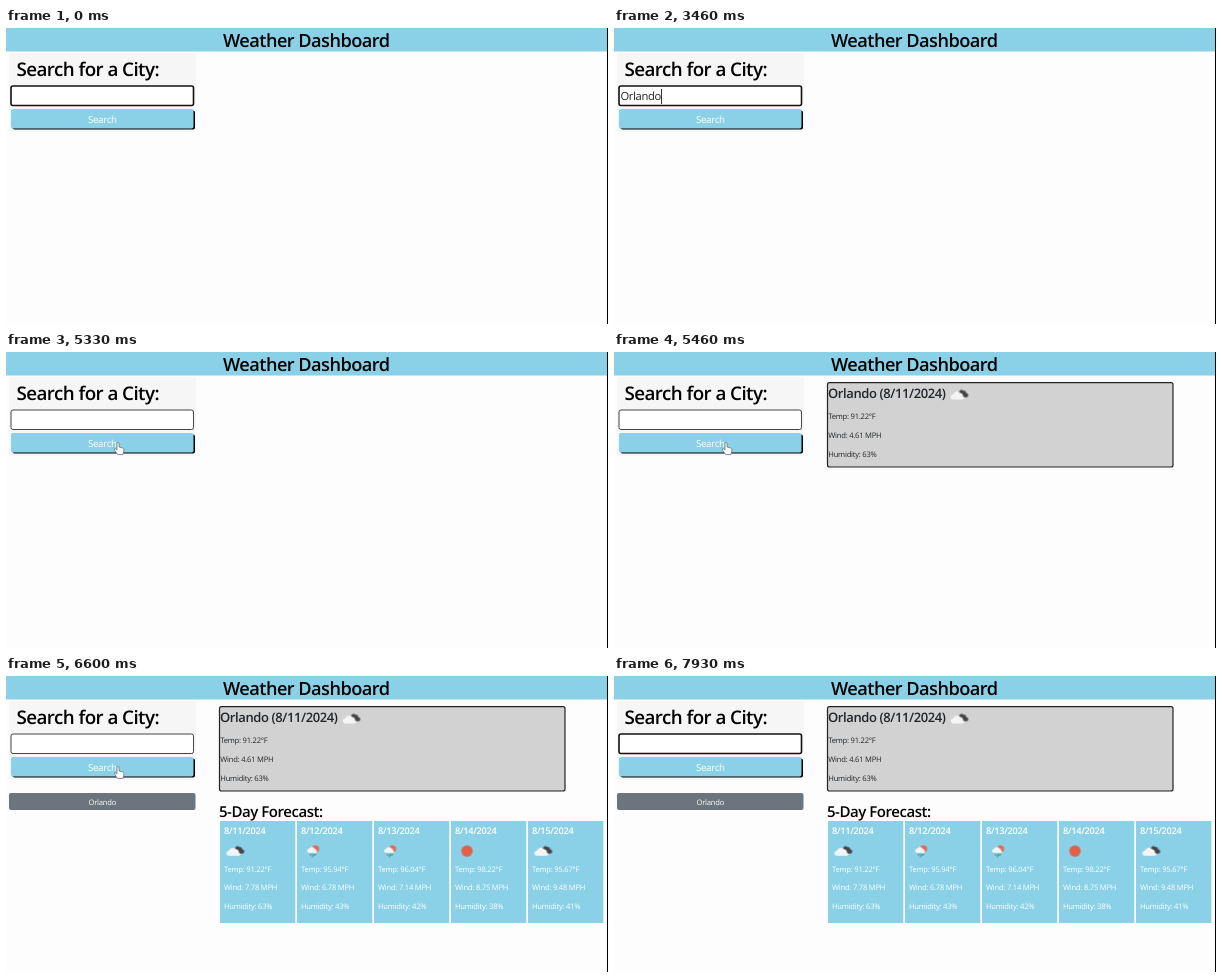
An HTML page for the animation above (8 s loop, 602x296 px).

```html
<!DOCTYPE html>
<html lang="en">
<head>
<meta charset="utf-8">
<title>Weather Dashboard</title>
<style>
  html, body { margin: 0; width: 100%; height: 100%; overflow: hidden; background: #fdfdfd; }
  svg { position: absolute; left: 0; top: 0; }
  text, .typed {
    font-family: "Open Sans", "Noto Sans", sans-serif;
    letter-spacing: -.03em;
    text-rendering: geometricPrecision;
    white-space: pre;
  }
  .h { font-weight: 600; }
  .mid { text-anchor: middle; }
  .small { font-size: 7.6px; }
  .white { fill: #fff; }

  .card, .card-icon, .days, .days-icon, .cursor, .typed, .ring {
    animation: 8s step-end infinite;
  }
  .card { animation-name: card; }
  .card-icon { animation-name: card-icon; }
  .days { animation-name: days; }
  .days-icon { animation-name: days-icon; }
  .ring { animation-name: ring; }
  .cursor { animation-name: cursor; animation-timing-function: linear; }

  @keyframes card { 0% { opacity: 0 } 67.5%, 100% { opacity: 1 } }
  @keyframes card-icon { 0% { opacity: 0 } 68.25%, 100% { opacity: 1 } }
  @keyframes days { 0% { opacity: 0 } 69.125%, 100% { opacity: 1 } }
  @keyframes days-icon { 0% { opacity: 0 } 70%, 100% { opacity: 1 } }
  @keyframes ring {
    0% { stroke: #111; stroke-width: 1.6px }
    60.75% { stroke: #444; stroke-width: 1px }
    93.25%, 100% { stroke: #111; stroke-width: 1.6px }
  }
  @keyframes cursor {
    0%, 52.49% { opacity: 0; transform: translate(140px, 82px) }
    52.5% { opacity: 1; transform: translate(140px, 82px); animation-timing-function: ease-out }
    60.75%, 85.75% { opacity: 1; transform: translate(112px, 90px) }
    90.74% { opacity: 1; transform: translate(103px, 79px) }
    90.75%, 100% { opacity: 0; transform: translate(103px, 79px) }
  }

  /* The clip width reveals the letters; its right border is the caret. */
  .typed {
    position: absolute; left: 6.4px; top: 61px; height: 15px;
    font-size: 11.2px; line-height: 15px; color: #222;
    overflow: hidden; border-right: 1px solid transparent;
    animation-name: type;
  }
  @keyframes type {
    0% { width: 0; border-color: transparent }
    4.125% { width: 0; border-color: #333 }
    10.75% { width: 0; border-color: transparent }
    17.5% { width: .75em; border-color: #333 }
    18.25% { width: 1.13em; border-color: #333 }
    25% { width: 1.13em; border-color: transparent }
    27.5% { width: 1.35em; border-color: #333 }
    30% { width: 1.88em; border-color: #333 }
    32.5% { width: 2.46em; border-color: #333 }
    35% { width: 3.04em; border-color: #333 }
    41.625% { width: 3.04em; border-color: transparent }
    43.25% { width: 3.62em; border-color: #333 }
    50% { width: 3.62em; border-color: transparent }
    56.625% { width: 3.62em; border-color: #333 }
    60.75% { width: 3.62em; border-color: transparent }
    66.625% { width: 0; border-color: transparent }
    93.25% { width: 0; border-color: #333 }
    99.125%, 100% { width: 0; border-color: transparent }
  }
</style>
</head>
<body>
<svg width="602" height="296" viewBox="0 0 602 296">
  <defs>
    <g id="cloud">
      <path fill="#444" d="M8.500 4.500a2.400 2.400 0 0 1 4.300-1.200A2 2 0 0 1 15.500 5.500a2.200 2.200 0 0 1 1 4.200H13z"/>
      <path fill="#f4f4f4" d="M2.500 12a2.600 2.600 0 0 1 .2-5.200A3.800 3.800 0 0 1 9.500 5.600a3.200 3.200 0 0 1 3 3.300a1.600 1.600 0 0 1 0 3.100z"/>
    </g>
    <g id="rain">
      <circle cx="12" cy="5" r="3.600" fill="#e8664c"/>
      <path fill="#f4f4f4" d="M5.500 9a2 2 0 0 1 .2-4A3 3 0 0 1 10.800 4.400a2.400 2.400 0 0 1 2 2.300a1.200 1.200 0 0 1-.2 2.300z"/>
      <path stroke="#555c60" stroke-width=".9" d="M7.500 10l-.7 1.800M10 10l-1.200 3.200M12 10l-.8 2"/>
    </g>
    <g id="sun"><circle cx="9.500" cy="7.200" r="5.700" fill="#e2604a"/></g>
  </defs>

  <rect width="602" height="23.500" fill="#8ad1e8"/>
  <text class="h mid" x="300.300" y="19.300" font-size="18.200">Weather Dashboard</text>

  <rect x="3" y="25" width="187" height="79" rx="2" fill="#f6f6f6"/>
  <text class="h" x="10.500" y="48" font-size="18.800">Search for a City:</text>
  <rect class="ring" x="5" y="58" width="182.500" height="19.500" rx="2" fill="#fff"/>
  <rect x="6.500" y="82.500" width="182.500" height="19" rx="2"/>
  <rect x="5" y="81" width="182.500" height="19.500" rx="2" fill="#8ad1e8"/>
  <text class="mid white" x="96.300" y="94.700" font-size="9.700">Search</text>

  <g class="days">
    <rect x="3" y="117" width="186.500" height="17" rx="2" fill="#6c757d"/>
    <text class="mid white small" x="96.300" y="128.600">Orlando</text>
  </g>

  <g class="card" fill="#212529">
    <rect x="213.500" y="30.700" width="345.500" height="84.300" rx="2" fill="#d2d2d2" stroke="#222" stroke-width="1.200"/>
    <text class="h" x="214" y="46" font-size="13">Orlando (8/11/2024)</text>
    <text class="small" x="214.300" y="67">Temp: 91.22°F</text>
    <text class="small" x="214.300" y="86">Wind: 4.61 MPH</text>
    <text class="small" x="214.300" y="104.700">Humidity: 63%</text>
    <use class="card-icon" href="#cloud" x="336.500" y="35.500"/>
  </g>

  <g class="days" id="days">
    <text class="h" x="213" y="140.500" font-size="15">5-Day Forecast:</text>
  </g>

  <rect x="601" width="1" height="296"/>

  <g class="cursor">
    <path fill="#fff" stroke="#666" stroke-width=".7" stroke-linejoin="round"
      d="M-1 1Q0-.5 1 1V5L5 6Q6.200 6.500 6 8L5 12.500H-.5L-3.500 8Q-4 6.500-2.500 6.800L-1 8z"/>
  </g>
</svg>
<div class="typed">Orlando</div>

<script>
  const forecast = [
    [11, "cloud", 91.22, 7.78, 63],
    [12, "rain", 95.94, 6.78, 43],
    [13, "rain", 96.04, 7.14, 42],
    [14, "sun", 98.22, 8.75, 38],
    [15, "cloud", 95.67, 9.48, 41]
  ];
  const dayCard = ([day, icon, temp, wind, humidity], i) => `
    <g class="white" transform="translate(${214 + i * 77} 145)">
      <rect width="75.300" height="102" fill="#8ad1e8"/>
      <text class="h" x="4" y="13" font-size="9.200">8/${day}/2024</text>
      <use class="days-icon" href="#${icon}" x="6.500" y="22.800"/>
      <text class="small" x="4" y="50.500">Temp: ${temp}°F</text>
      <text class="small" x="4" y="69.300">Wind: ${wind} MPH</text>
      <text class="small" x="4" y="88">Humidity: ${humidity}%</text>
    </g>`;
  document.getElementById("days").insertAdjacentHTML("beforeend", forecast.map(dayCard).join(""));
</script>
</body>
</html>
```
